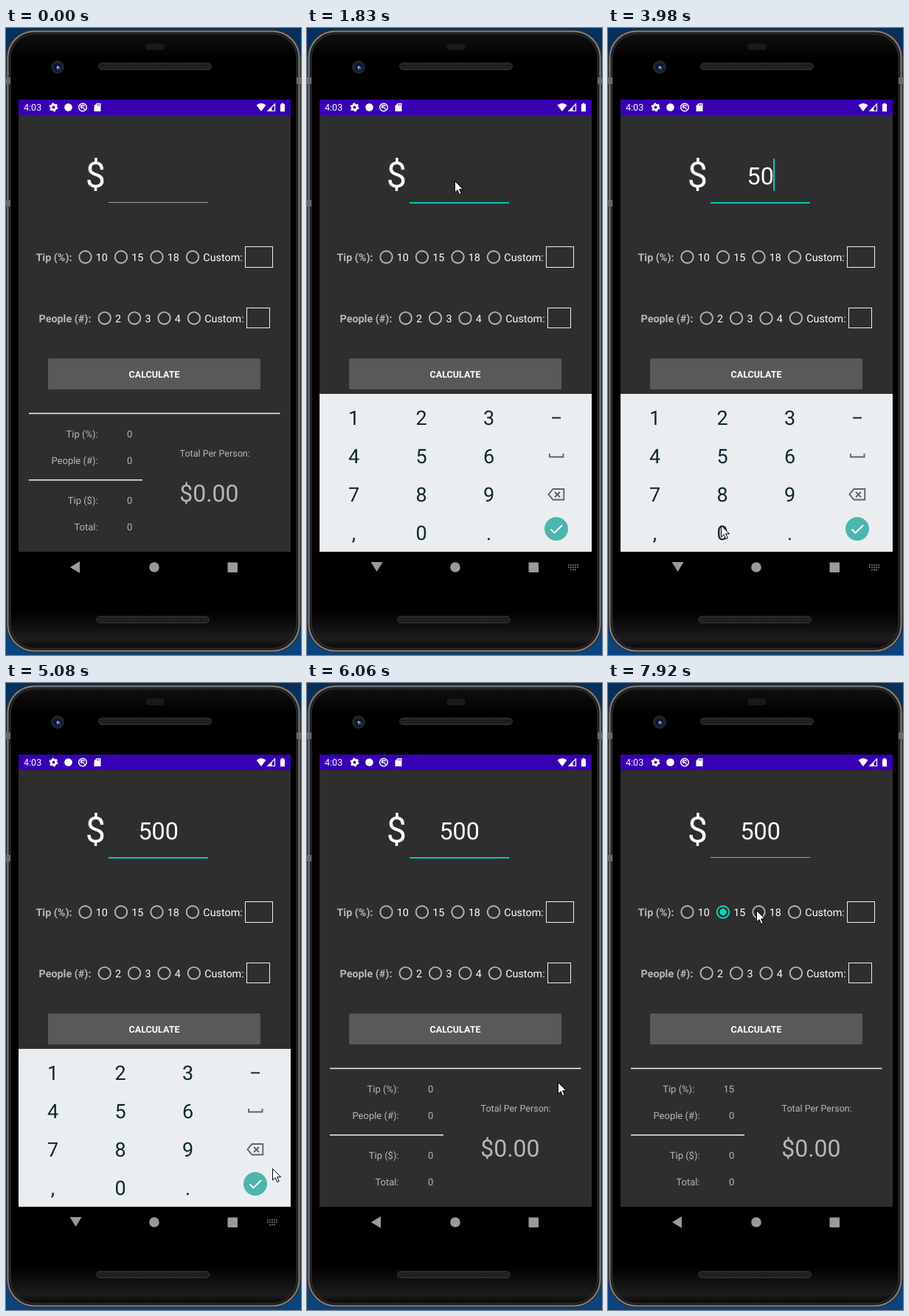
Animation, 400 px wide and 850 px high, one loop 8 s. Source, as an HTML page:

```html
<!DOCTYPE html>
<html lang="en">
<head>
<meta charset="utf-8">
<title>Tip calculator</title>
<style>
html, body { margin: 0; width: 100%; height: 100%; overflow: hidden; background: linear-gradient(#06305c, #0a4480); }
svg { display: block; width: 400px; height: 850px; font-family: Roboto, sans-serif; text-rendering: geometricPrecision; }
</style>
</head>
<body>
<svg id="stage" viewBox="0 0 400 850">
  <defs>
    <linearGradient id="glass" x2="0" y2="1">
      <stop offset="0" stop-color="#101010"/><stop offset=".04" stop-color="#000"/>
      <stop offset=".94" stop-color="#000"/><stop offset=".985" stop-color="#1d1d1d"/><stop offset="1" stop-color="#080808"/>
    </linearGradient>
    <pattern id="mesh" width="3" height="3" patternUnits="userSpaceOnUse">
      <rect width="3" height="3" fill="#1b1b1b"/><circle cx="1.5" cy="1.5" r=".8" fill="#343434"/>
    </pattern>
  </defs>

  <!-- phone body -->
  <rect x="0" y="2" width="400" height="845" rx="38" fill="#2c2c2c"/>
  <rect x="2.500" y="4.500" width="395" height="840" rx="36" fill="#1c1c1c" stroke="#808080" stroke-width="2"/>
  <rect x="6" y="8" width="388" height="833" rx="33" fill="url(#glass)" stroke="#343434"/>
  <path d="M0 67h6v9H0zM394 67h6v9h-6zM0 233h6v9H0z" fill="#6a6a6a"/>
  <rect x="189" y="21" width="26" height="9" rx="4.5" fill="#191919"/>
  <g fill="url(#mesh)" stroke="#333">
    <rect x="125.500" y="47.500" width="153" height="9" rx="4.500"/>
    <rect x="122.500" y="797.500" width="153" height="9" rx="4.500"/>
  </g>
  <circle cx="70" cy="53" r="9" fill="#242424"/>
  <circle cx="70" cy="53" r="5.500" fill="#10152e"/>
  <circle cx="71" cy="54" r="2.600" fill="#3c55b5"/>
  <circle cx="70" cy="53" r="1.200" fill="#c4cdf2"/>

  <!-- app -->
  <rect x="17" y="97" width="369" height="613" fill="#2e2e2e"/>
  <rect x="17" y="97" width="369" height="21" fill="#3700b3"/>
  <g fill="#fff">
    <circle cx="64.500" cy="107.500" r="3.400" fill="none" stroke="#fff" stroke-width="2.800"/>
    <circle cx="64.500" cy="107.500" r="5.200" fill="none" stroke="#fff" stroke-width="1.600" stroke-dasharray="2.700 2.745"/>
    <circle cx="84.500" cy="107.500" r="5.300"/>
    <circle cx="104" cy="107.500" r="5.300" fill="none" stroke="#fff" stroke-width="1.500"/>
    <path d="M101 105l6 5.500M102.500 109a2.500 2.500 0 1 1 4-2.500" fill="none" stroke="#fff" stroke-width="1.400"/>
    <path d="M123 102h5.500v11h-9v-7.500z"/>
    <path d="M124 103v2.500M126.300 103v2.500" stroke="#3700b3"/>
    <path d="M339.500 104.500q6.500-5 13 0l-6.500 8.500z"/>
    <path d="M355 112.500h9.500V103z" fill="none" stroke="#fff" stroke-width="1.200"/>
    <path d="M355 113l5.500-5.500v5.500z"/>
    <path d="M372 103.200h1.700v-1.400h2.600v1.400h1.700v10h-6z"/>
  </g>
  <g id="labels"></g>
  <rect id="line" x="139" width="135"/>
  <text id="amount" x="206.700" y="212" font-size="32.300" fill="#fff" text-anchor="middle"></text>
  <rect id="caret" y="177" width="2" height="43.500" fill="#04c7b3"/>
  <g fill="none" stroke="#f0f0f0">
    <rect x="324.500" y="296.500" width="37" height="28"/>
    <rect x="326.500" y="379.500" width="31" height="27"/>
  </g>
  <g id="radios" fill="none" stroke="#b7b7b7" stroke-width="1.900"></g>
  <circle id="dot" cx="156" cy="310.500" fill="#04dac5"/>
  <rect x="57" y="448" width="288" height="42" rx="2" fill="#595959"/>
  <text x="201" y="474" font-size="12.560" font-weight="700" fill="#fff" text-anchor="middle">CALCULATE</text>
  <path d="M31 522.500H371.500M31 612.700H185" stroke="#f4f4f4" stroke-width="1.500"/>

  <!-- keypad -->
  <g id="pad">
    <rect x="17" y="496" width="369" height="214" fill="#ebeef1"/>
    <g id="keys" font-size="27" fill="#0c2730" text-anchor="middle"></g>
    <path d="M332 528.500h12" stroke="#0c2730" stroke-width="2"/>
    <g fill="none" stroke="#53666d" stroke-width="1.900">
      <path d="M329 577v4.500h18.500V577"/>
      <path d="M333.500 625h14.800v14.500h-14.800l-6-7.250zM336 629l7 7M343 629l-7 7"/>
    </g>
    <circle id="ok" cx="338" cy="679" r="16"/>
    <path d="M330.500 679.500l5 5L346 674" fill="none" stroke="#fff" stroke-width="1.900"/>
  </g>

  <!-- navigation -->
  <g fill="#9a9a9a">
    <path id="back" d="M-7 0L6-8V8z"/>
    <circle cx="201" cy="731" r="6.800"/>
    <rect x="300.500" y="724.500" width="13.500" height="13.500" rx="1"/>
    <path id="kb" d="M354 728h14M354 731h14M357 734.500h8" stroke="#7c7c7c" stroke-width="1.600" stroke-dasharray="2 1"/>
  </g>

  <path id="mouse" d="M.5.5V16l3.600-3.400 2.500 6 2.600-1.100-2.500-5.800h5z" fill="#fff" stroke="#000" stroke-width="1"/>
</svg>
<script>
const $ = id => document.getElementById(id);
const set = (el, attrs) => { for (const k in attrs) el.setAttribute(k, attrs[k]); return el; };
const add = (parent, tag, attrs, text = "") => {
  const el = set(document.createElementNS("http://www.w3.org/2000/svg", tag), attrs);
  el.textContent = text;
  return $(parent).appendChild(el);
};
const label = (text, x, y, size, fill, more) =>
  add("labels", "text", { x, y, "font-size": size, fill, ...more }, text);

const GREY = "#b7b7b7", TEAL = "#04dac5", BIG = 14.35, SMALL = 12.56, ROW = 13;

label("4:03", 24, 112.3, SMALL, "#fff");
label("$", 121.5, 216, 48.5, "#fff", { "text-anchor": "middle" });
label("Total Per Person:", 235.5, 581, SMALL, GREY);
label("$0.00", 235.2, 642, 32, GREY);

// Each group: title, title x, baseline, first radio x, spacing, options
const radios = [["Tip (%):", 40.5, 315.7, 107.5, 48.5, [10, 15, 18, "Custom:"]],
  ["People (#):", 44.5, 398.5, 133.7, 40.4, [2, 3, 4, "Custom:"]]
].flatMap(([title, x, y, cx, step, options]) => {
  label(title, x, y, BIG, GREY, { "font-weight": 700 });
  return options.map((option, i) => {
    label(option, cx + i * step + 14.3, y, BIG, "#fff");
    return add("radios", "circle", { cx: cx + i * step, cy: y - 5.2, r: 8.2 });
  });
});

const end = { "text-anchor": "end" };
const [tipRow] = [["Tip (%):", 555], ["People (#):", 590.7], ["Tip ($):", 645.2], ["Total:", 681]]
  .map(([name, y]) => [label(name, 124.6, y, ROW, GREY, end), label("0", 171.2, y, ROW, GREY, end)]);

["123", "456", "789", ",0."].forEach((row, r) => [...row].forEach((key, c) =>
  add("keys", "text", { x: 63.5 + c * 91.5, y: 538 + r * 52 }, key)));

const smooth = u => u * u * (3 - 2 * u), linear = u => u, out = u => u * (2 - u);
const part = (t, a, b) => Math.min(1, Math.max(0, (t - a) / (b - a)));

// Pointer moves: start, end, control x, y, target x, y, easing
const moves = [
  [340, 1070, 100, 122, 200, 207],
  [1950, 2360, 75, 420, 167, 601],
  [2570, 2580, 167, 601, 166, 601],
  [2730, 2760, 166, 601, 165, 600],
  [3350, 3510, 168, 640, 153, 674],
  [4560, 5080, 420, 630, 361, 658],
  [5180, 5520, 356, 680, 343, 683],
  [5970, 6060, 345, 610, 340, 543, linear],
  [6060, 6510, 300, 320, 197, 308, out],
  [6540, 6800, 175, 304, 155, 306, out],
  [7200, 7650, 170, 304, 189, 306],
  [7860, 7920, 195, 307, 201, 308]
];

function pointer(t) {
  let x = -14, y = 303;
  for (const [a, b, cx, cy, tx, ty, ease = smooth] of moves) {
    if (t < a) break;
    const u = ease(part(t, a, b)), v = 1 - u;
    x = v * v * x + 2 * u * v * cx + u * u * tx;
    y = v * v * y + 2 * u * v * cy + u * u * ty;
  }
  return [x, y];
}

// Typing: time, text, caret x, blink period
const edits = [[1365, "", 206, 465], [3190, "5", 215, 500], [3960, "50", 224, 500], [4470, "500", 233.5, 500]];
const FOCUS = 1330, PICK = 7000;

function draw(t) {
  const edit = edits.filter(e => e[0] <= t).pop();
  const focused = t >= FOCUS && t < PICK;
  $("amount").textContent = edit ? edit[1] : "";
  const lit = edit && focused && Math.floor((t - edit[0]) / edit[3]) % 2 === 0;
  set($("caret"), { x: edit ? edit[2] : 0, opacity: lit ? 1 : 0 });
  set($("line"), focused ? { y: 236, height: 2, fill: "#04c7b3" } : { y: 236, height: 1, fill: "#a0a0a0" });

  const show = t < 5000 ? out(part(t, 1420, 1550)) : 1 - part(t, 5807, 5957) ** 2;
  set($("pad"), { opacity: show, transform: `translate(0 ${50 * (1 - show)})` });
  set($("ok"), { fill: t > 5720 ? "#00a99c" : "#4db6ac" });
  const turn = smooth(part(t, 1360, 1550)) - smooth(part(t, 5795, 5955));
  set($("back"), { transform: `translate(${94 + turn * 0.6} ${731 - turn}) rotate(${-90 * turn})` });
  set($("kb"), { opacity: t > 1390 && t < 5800 ? 1 : 0 });

  const picked = t >= PICK;
  set(radios[1], { stroke: picked ? TEAL : GREY });
  set($("dot"), { r: 4.6 * out(part(t, PICK, PICK + 150)) });
  set(tipRow[0], { x: picked ? 117.3 : 124.6 });
  tipRow[1].textContent = picked ? "15" : "0";

  set($("mouse"), { transform: `translate(${pointer(t).map(Math.round)})` });
}

const began = performance.now();
function tick() {
  draw((performance.now() - began) % 8000);
  requestAnimationFrame(tick);
}
tick();
</script>
</body>
</html>
```
